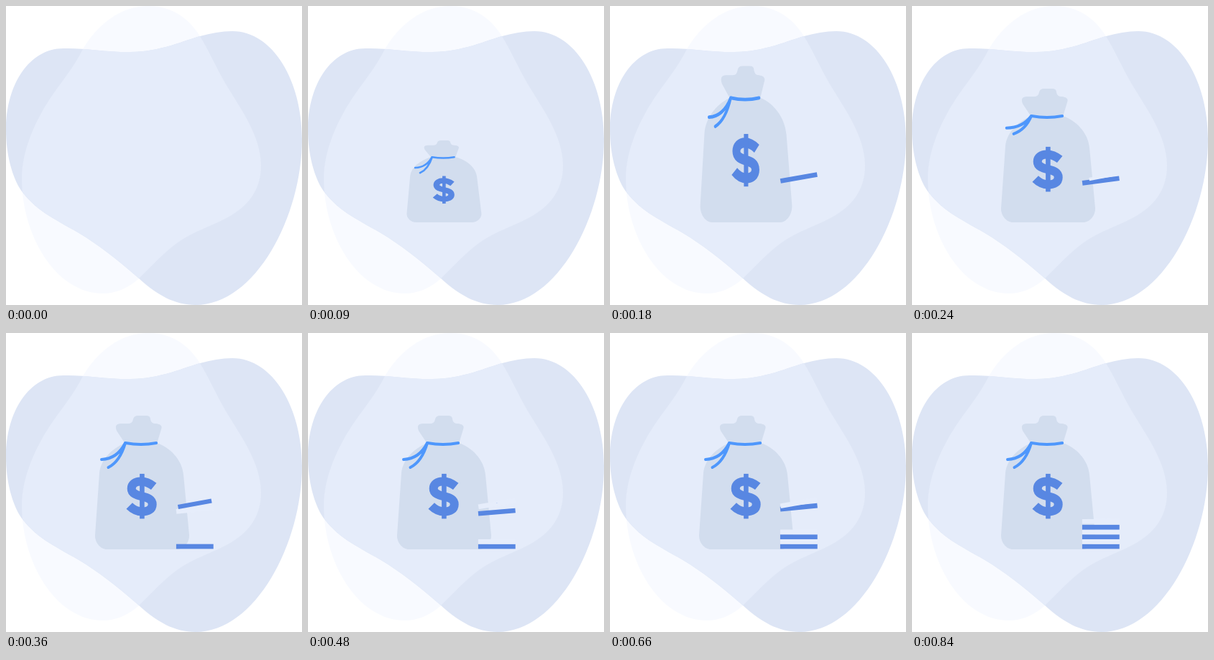
An HTML page that plays this animation: 412x416 px, repeating every 1200 ms.

```html
<!DOCTYPE html>
<html lang="en">
<head>
<meta charset="utf-8">
<title>Savings</title>
<style>
  html, body { margin: 0; width: 100%; height: 100%; overflow: hidden; background: #fff; }
  svg { display: block; width: 100%; height: 100%; }
  .bag { fill: #d2ddee; }
  .ribbon { fill: none; stroke: #4e97fc; stroke-width: 4; stroke-linecap: round; }
  .sign { fill: none; stroke: #5887e2; }
</style>
</head>
<body>
<svg viewBox="0 0 412 416">
  <defs>
    <path id="wide" d="M0 172C0 110 32 59 80 59C107 58 135 64 172 64C215 64 250 47 270 42C285 38 300 35 315 35C372 35 412 105 412 185C412 293 347 416 264 416C235 416 210 402 185 379C155 353 130 333 100 315C65 295 43 285 22 258C8 238 0 205 0 172Z"/>
    <path id="tall" d="M198 0C232 0 255 18 270 42C283 63 292 85 305 107C325 141 355 180 355 222C355 262 330 283 305 296C285 306 262 314 242 327C220 342 203 362 185 379C171 392 153 400 135 400C70 400 22 320 22 240C22 200 42 156 66 122C80 102 95 84 107 60C128 25 160 0 198 0Z"/>
    <clipPath id="overlap"><use href="#wide"/></clipPath>
  </defs>
  <use href="#tall" fill="#f8faff"/>
  <use href="#wide" fill="#dde5f5"/>
  <use href="#tall" fill="#e5ecfa" clip-path="url(#overlap)"/>

  <path id="body" class="bag" d="M166 153Q188 157 210 153C228 159 245 176 247 197L255 281C255.5 291 248 301 238 301L141 301C131 301 123.5 291 124 281L130 195C132 176 147 161 166 153Z"/>
  <path id="cap" class="bag" d="M166 154L154 136Q150 126 160 126L170 126Q176 126 177 120Q178 115 184 115L195 115Q201 115 201 120Q202 126 208 126Q219 127 216 134L210 154Q188 158 166 154Z"/>
  <g id="trim">
    <g class="sign" transform="translate(.7 .4)">
      <path stroke-width="12" d="M205 213C200 209 193 206 187 206C179 206 174 210 174 216C174 223 181 225 189 227C197 229 203 231 203 238C203 245 197 248 189 248C182 248 176 245 171 240"/>
      <path stroke-width="6.6" d="M188.7 195.5V258"/>
    </g>
    <path class="ribbon" d="M166.4 153Q188 157 209.2 153"/>
    <path class="ribbon" id="tails"/>
  </g>
  <g id="stack"></g>
</svg>
<script>
const LOOP = 1200, STEP = 30;
const LAND = 120, SETTLE = 240;
const FIRST = 90, STAGGER = 97, FALL = 268;
const WIDEN = { body: .19, cap: .14, trim: .07 };
const $ = id => document.getElementById(id);
const progress = (t, from, to) => Math.min(1, Math.max(0, (t - from) / (to - from)));

const bars = Array.from({ length: 6 }, (_, i) => {
  const el = document.createElementNS("http://www.w3.org/2000/svg", "rect");
  const attrs = { x: -25.9, y: -3.35, width: 51.8, height: 6.7, fill: i % 2 ? "#e6edfb" : "#5887e2" };
  for (const k in attrs) el.setAttribute(k, attrs[k]);
  $("stack").append(el);
  return { el, start: FIRST + STAGGER * i, from: 238.5 - .5 * i, to: 297 - 6.7 * i };
});

// The bag grows into a squash, stretches once, then rests.
function drawBag(t) {
  const grow = progress(t, 30, LAND);
  const p = progress(t, LAND, SETTLE);
  const bounce = Math.sin(Math.PI * p);
  const sy = grow * (.92 + .08 * p + .21 * bounce);
  for (const id in WIDEN) {
    const sx = grow * (1 + WIDEN[id] * (1 - p) - .12 * bounce);
    $(id).setAttribute("transform", `translate(189.2 301) scale(${sx} ${sy}) translate(-189.2 -301)`);
    $(id).style.display = grow ? "" : "none";
  }
  const lift = Math.exp(-(((t - SETTLE) / 40) ** 2)) - .2 * (1 - p);
  $("tails").setAttribute("d", tail(155, 175, 133, 176, lift) + tail(158.5, 179, 142.5, 187, lift));
}

// A ribbon end hanging from the knot, swung upwards by lift.
function tail(cx, cy, x, y, lift) {
  const swing = (px, py) => `${166 + (px - 166) * (1 + .04 * lift)} ${py - lift * (py - 153) * .27}`;
  return `M166 153Q${swing(cx, cy)} ${swing(x, y)}`;
}

function drawBar({ el, start, from, to }, t) {
  const u = progress(t, start, start + FALL);
  const y = from + (to - from) * u ** 4.4;
  const tilt = -11.5 * Math.cos(u * Math.PI / 2);
  const scale = Math.min(1, u / .31);
  el.style.display = u ? "" : "none";
  el.setAttribute("transform", `translate(262.8 ${y}) rotate(${tilt}) scale(${scale})`);
}

const begin = performance.now();
function tick() {
  const now = (performance.now() - begin) % LOOP;
  const t = Math.floor(now / STEP) * STEP;
  drawBag(t);
  bars.forEach(bar => drawBar(bar, t));
  requestAnimationFrame(tick);
}
tick();
</script>
</body>
</html>
```
